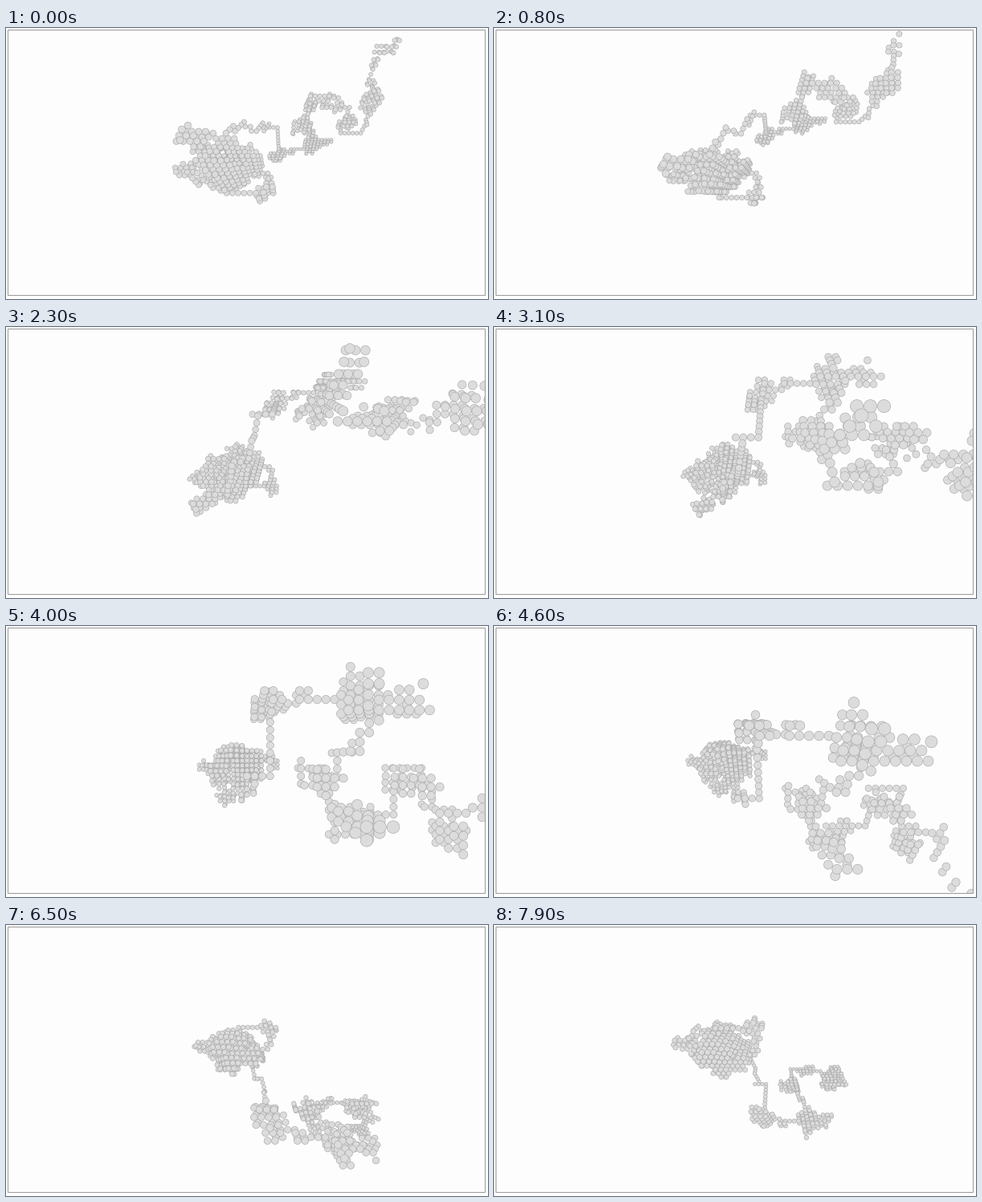
Recreate the animation shown at these times as a matplotlib script. Size 600 by 338 pixels, loop 8 s.

```python
import random

import numpy as np
import matplotlib.pyplot as plt
from matplotlib.animation import FuncAnimation
from matplotlib.patches import Rectangle

W, H, DPI = 600, 338, 100
FRAMES, INTERVAL = 80, 100
CENTRE = np.array([300, 168])
CAMERA = 160          # distance from eye to pivot
UNIT = 6              # lattice spacing
RADIUS = 2.85
SPEED = np.radians(33)
FACE_ON = 4.0         # time at which the lattice faces the viewer
LEAN = 0.3            # sideways drift of points as they recede

# Key points the random walk is drawn to
CORE = (-9, 10, -5)
LIMBS = [(-54, 12, -18), (-32, 50, -14), (40, 2, -40)]
TAIL = [(18, -38, 62), (72, -43, 78), (93, -30, 84), (55, 11, 57),
        (62, 33, 88), (85, 56, 64), (119, 20, 60), (147, 46, 74),
        (145, 95, 120)]


class Walk:
    """Random walk on a cubic lattice that remembers its cells."""

    def __init__(self, start, seed):
        self.rng = random.Random(seed)
        self.pos = self.cell(start)
        self.seen = {self.pos: True}

    @staticmethod
    def cell(point):
        return tuple(round(v / UNIT) for v in point)

    def step(self, axis, move):
        out = list(self.pos)
        out[axis] += move
        return tuple(out)

    def stray(self):
        return self.step(self.rng.randrange(3), self.rng.choice((-1, 1)))

    def visit(self, pos):
        self.pos = pos
        self.seen[pos] = True

    def go(self, point, aim=0.65):
        goal = self.cell(point)
        while self.pos != goal:
            if self.rng.random() < aim:
                gaps = [a for a in range(3) if self.pos[a] != goal[a]]
                axis = self.rng.choice(gaps)
                self.visit(self.step(axis, 1 if goal[axis] > self.pos[axis] else -1))
            else:
                self.visit(self.stray())

    def wander(self, point, count, reach):
        self.go(point)
        goal = self.cell(point)
        for _ in range(count):
            new = self.stray()
            if sum((a - b) ** 2 for a, b in zip(new, goal)) <= reach ** 2:
                self.visit(new)


def build(seed):
    walk = Walk(LIMBS[0], seed)
    for limb in LIMBS:
        walk.wander(limb, 50, 2.3)
        walk.wander(CORE, 330, 6)
    for point in TAIL:
        count = walk.rng.randint(35, 85)
        walk.wander(point, count, count ** 0.25)
    return np.array(list(walk.seen), float) * UNIT


points = build(11)


def project(t):
    x, y, z = points.T
    angle = SPEED * (t - FACE_ON)
    c, s = np.cos(angle), np.sin(angle)
    depth = c * z - s * y
    flat = np.column_stack((x + LEAN * (z - depth), c * y + s * z))
    order = np.argsort(depth)
    order = order[depth[order] < CAMERA - 12]
    scale = CAMERA / (CAMERA - depth[order])
    return CENTRE + flat[order] * scale[:, None], (2 * RADIUS * scale * 72 / DPI) ** 2


fig = plt.figure(figsize=(W / DPI, H / DPI), dpi=DPI, facecolor="white")
ax = fig.add_axes([0, 0, 1, 1])
ax.set_xlim(0, W)
ax.set_ylim(H, 0)
ax.axis("off")

box = dict(xy=(2.5, 2.5), width=594, height=331, snap=False)
ax.add_patch(Rectangle(**box, fc="#fdfdfd", ec="none", zorder=0))
dots = ax.scatter([], [], fc="#dcdcdc", ec="#a9a9a9", lw=0.45, zorder=1)
dots.set_clip_path(Rectangle(**box, transform=ax.transData))
ax.add_patch(Rectangle(**box, fc="none", ec="#999999", lw=0.72, zorder=2))


def draw(i):
    xy, sizes = project(i * INTERVAL / 1000)
    dots.set_offsets(xy)
    dots.set_sizes(sizes)
    return (dots,)


anim = FuncAnimation(fig, draw, frames=FRAMES, interval=INTERVAL,
                     repeat=True, repeat_delay=0)
plt.show()
```
